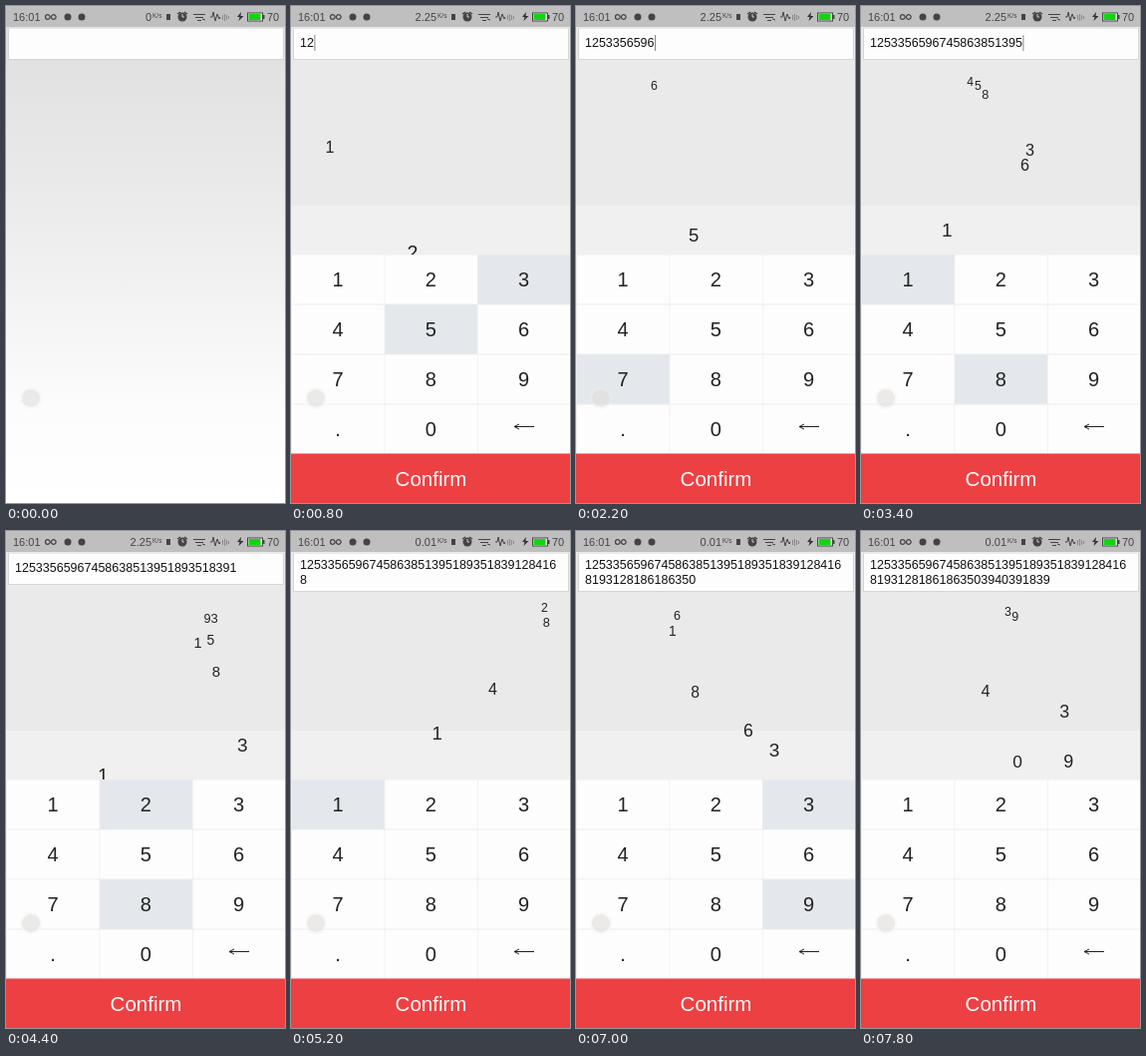
Animation of 280x498 px, one loop 8000 ms. Source, as an HTML page with a canvas:

```html
<!DOCTYPE html>
<html lang="en">
<head>
<meta charset="utf-8">
<title>Number pad</title>
<style>
  html, body { margin: 0; width: 100%; height: 100%; overflow: hidden; background: #eee; }
  canvas { display: block; width: 280px; height: 498px; }
</style>
</head>
<body>
<canvas></canvas>
<script>
const W = 280, H = 498, LOOP = 8000, STEP = 200;
const FLIGHT = 800, PRESS = 130, LINE_LENGTH = 37, DIGIT_WIDTH = 6.95;
const KEYS = ['1', '2', '3', '4', '5', '6', '7', '8', '9', '.', '0', '←'];
const DIGITS = '125335659674586385139518935183912841681931281861863503940391839';
// Release time of each typed digit, in ms.
const RELEASES = [
  296, 550, 860, 920, 1120, 1300, 1472, 1836, 1900, 1960,
  2300, 2636, 2672, 2708, 2902, 2904, 3060, 3090, 3092, 3200, 3260, 3340,
  3440, 3500, 3706, 3728, 3786, 3816, 3840, 4068, 4100, 4145,
  4460, 4520, 4700, 4840, 5000, 5160, 5300, 5464, 5484, 5684, 5876, 5920, 6000, 6080,
  6300, 6380, 6480, 6580, 6680, 6780, 6900, 7090, 7098, 7304, 7360, 7390, 7394,
  7600, 7640, 7680, 7740
];

const canvas = document.querySelector('canvas');
const ctx = canvas.getContext('2d');
const ratio = window.devicePixelRatio || 1;
canvas.width = W * ratio;
canvas.height = H * ratio;

function rect(x, y, w, h, color) {
  ctx.fillStyle = color;
  ctx.fillRect(x, y, w, h);
}

function text(value, x, y, size, color = '#222', align = 'center') {
  ctx.font = `${size}px "Liberation Sans", Arial, sans-serif`;
  ctx.textAlign = align;
  ctx.textBaseline = 'alphabetic';
  ctx.fillStyle = color;
  ctx.fillText(value, x, y + size * 0.35);
}

function circle(x, y, r, color) {
  ctx.fillStyle = color;
  ctx.beginPath();
  ctx.arc(x, y, r, 0, Math.PI * 2);
  ctx.fill();
}

function stroke(path, color = '#444', width = 1) {
  ctx.strokeStyle = color;
  ctx.lineWidth = width;
  ctx.stroke(new Path2D(path));
}

function keyCenter(key) {
  const i = KEYS.indexOf(key);
  return { x: 47 + (i % 3) * 93.3, y: 274 + Math.floor(i / 3) * 50 };
}

function drawBackground(open) {
  if (open) {
    rect(0, 0, W, 200, '#eaeaea');
    rect(0, 200, W, 50, '#f0f0f0');
    return;
  }
  const fade = ctx.createLinearGradient(0, 21, 0, H);
  fade.addColorStop(0, '#dfdfdf');
  fade.addColorStop(0.4, '#ececec');
  fade.addColorStop(0.8, '#fcfcfc');
  fade.addColorStop(1, '#fff');
  rect(0, 0, W, H, fade);
}

function drawStatusBar(t) {
  const ink = '#444';
  rect(0, 0, W, 21, '#bfbfbf');
  text('16:01', 7, 11, 11, ink, 'left');
  stroke('M39.500 11a2.300 2.300 0 1 0 4.600 0a2.300 2.300 0 1 0-4.600 0M45.500 11a2.300 2.300 0 1 0 4.600 0a2.300 2.300 0 1 0-4.600 0', ink, 1.3);
  circle(62, 11, 3.5, ink);
  circle(76, 11, 3.5, ink);
  text(t < STEP ? '0' : t < 5200 ? '2.25' : '0.01', 146, 11, 11, ink, 'right');
  text('K/s', 147, 10, 6.500, ink, 'left');
  rect(161, 8, 4, 6, ink);

  circle(177, 11, 4.5, ink);
  stroke('M177 8v3h2', '#ccc');
  stroke('M172 8l3-2M182 8l-3-2', ink, 1.3);
  stroke('M188 8.5h12M190 11.5h8M192 14.5h4M197 13l3 1', ink);
  stroke('M205 11h2l1-5 2 9 2-7 2 5 1-2', ink);
  stroke('M217.500 9v5M219.500 8v7M221.500 9v5M223.500 10v3', '#888');
  ctx.fillStyle = '#333';
  ctx.fill(new Path2D('M236 6l-4 5h2.500l-1 4 5-5h-3z'));
  rect(242, 6.5, 16, 9, '#444');
  rect(258, 9, 1.500, 4, '#444');
  rect(243, 7.5, 14, 7, '#eee');
  rect(243.5, 8, 12, 6, '#12d512');
  text('70', 262, 11, 11, ink, 'left');
}

function drawInput(typed, t) {
  const twoLines = typed.length > LINE_LENGTH;
  const height = twoLines ? 38 : 31;
  const firstLine = twoLines ? 33.500 : 37;
  rect(2, 22, 277, height + 1, '#d6d6d6');
  rect(3, 22.500, 275, height - 0.5, '#fdfdfd');
  for (let i = 0; i * LINE_LENGTH < typed.length; i++) {
    const line = typed.slice(i * LINE_LENGTH, (i + 1) * LINE_LENGTH);
    text(line, 9, firstLine + i * 15, 12.5, '#111', 'left');
  }
  if (t >= STEP && t < 4000) {
    rect(9.5 + typed.length * DIGIT_WIDTH, 29, 1, 16, '#888');
  }
}

// Each digit glides from its key to just below its place in the text.
function drawFlights(t) {
  RELEASES.forEach((release, i) => {
    const phase = (t - release) / FLIGHT;
    if (phase < 0 || phase >= 1) return;
    const p = (1 - Math.cos(phase * Math.PI)) / 2;
    const key = keyCenter(DIGITS[i]);
    const startX = key.x + 5, startY = key.y + 22;
    const endX = 30 + (i % LINE_LENGTH + 0.5) * DIGIT_WIDTH, endY = 74;
    const size = 20 - 8 * p * p;
    text(DIGITS[i], startX + (endX - startX) * p, startY + (endY - startY) * p, size);
  });
}

function drawKeyboard(t) {
  const pressed = RELEASES.map((r, i) => t >= r - PRESS && t < r ? DIGITS[i] : '');
  rect(0, 249, W, 200, '#ededed');
  for (const key of KEYS) {
    const { x, y } = keyCenter(key);
    rect(x - 46, y - 24.5, 92.600, 49, pressed.includes(key) ? '#e4e8ec' : '#fdfdfd');
    if (key === '←') stroke('M244 421.500H224M229 419L224 421.500L229 424', '#222');
    else text(key, x, y, 20);
  }
  rect(0, 448.500, W, 50, '#ed4043');
  text('Confirm', 140.500, 474, 20.500, '#fff');
}

function drawTouchDot() {
  circle(25, 393, 11, 'rgba(240,238,236,.3)');
  circle(25, 393, 9, 'rgba(218,212,210,.4)');
}

function render(t) {
  const open = t >= STEP;
  const typed = DIGITS.slice(0, RELEASES.filter(r => r <= t).length);
  ctx.setTransform(ratio, 0, 0, ratio, 0, 0);
  drawBackground(open);
  drawStatusBar(t);
  drawInput(typed, t);
  if (open) {
    drawFlights(t);
    drawKeyboard(t);
  }
  drawTouchDot();
}

const start = performance.now();
function tick() {
  const t = (performance.now() - start) % LOOP;
  render(Math.floor(t / STEP) * STEP);
  requestAnimationFrame(tick);
}
tick();
</script>
</body>
</html>
```
